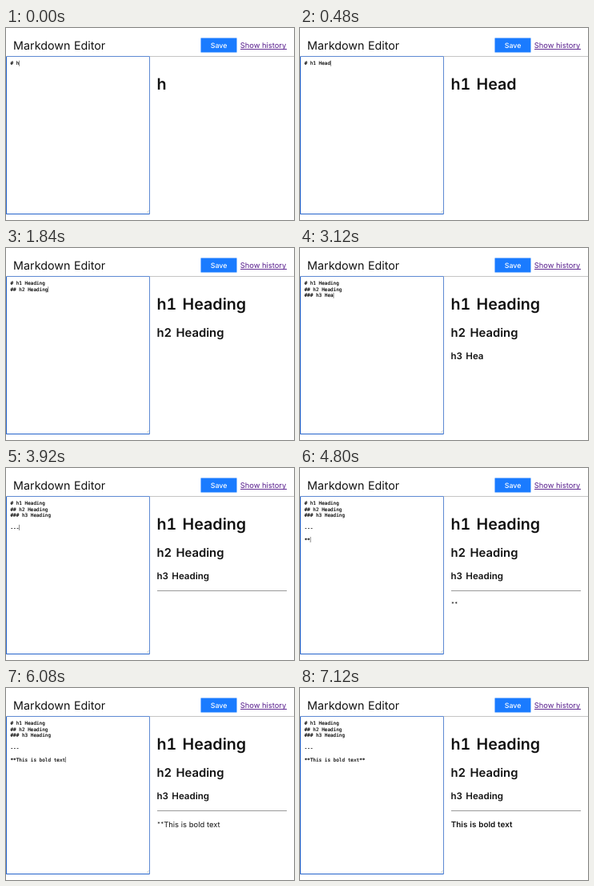
Write an HTML page that moves like this. It is 360 px wide and 240 px high and loops after 7200 ms.

```html
<!DOCTYPE html>
<html lang="en">
<head>
<meta charset="utf-8">
<title>Markdown Editor</title>
<style>
  html, body { margin: 0; width: 100%; height: 100%; overflow: hidden; background: #fff; }
  svg { display: block; width: 360px; height: 240px; }
  text {
    font-family: Inter, "Open Sans", sans-serif; font-variant-numeric: tabular-nums;
    fill: #111; white-space: pre; text-rendering: geometricPrecision;
  }
  .title { font-size: 14.3px; word-spacing: .05em; }
  .save { font-size: 8.8px; font-weight: 500; fill: #fff; text-anchor: middle; }
  .link { font-size: 9.4px; fill: #551a8b; }
  #source text { font: 6px "DejaVu Sans Mono", monospace; fill: #000; stroke: #000; stroke-width: .15px; }
  #h1, #h2, #h3 { font-weight: 600; word-spacing: .1em; }
  #h1 { font-size: 19.7px; }
  #h2 { font-size: 14.8px; }
  #h3 { font-size: 11.55px; }
  #para { font-size: 9.4px; word-spacing: .03em; }
  #para .stars { font-size: 6.8px; letter-spacing: -.03em; baseline-shift: 1.6px; }
  #para .bold { font-size: 9.9px; font-weight: 600; }
  #para .em { font-style: italic; }
</style>
</head>
<body>
<svg viewBox="0 0 360 240">
  <text class="title" x="9.1" y="26.5">Markdown Editor</text>
  <rect x="243.5" y="12.5" width="45" height="18" fill="#1a7bff"/>
  <text class="save" x="266.1" y="25">Save</text>
  <text class="link" x="292.8" y="25">Show history</text>
  <path d="M293 26.5H351" stroke="#551a8b" stroke-width=".9"/>
  <path d="M0 35.5H360" stroke="#c4c4c4"/>
  <rect x=".5" y="35.5" width="179" height="197" rx=".5" fill="#fff" stroke="#5f8ad2"/>
  <path d="M.5 36V232.5H179.5" fill="none" stroke="#2463cc"/>
  <path d="M175.8 231L178.8 228M177.6 231L178.8 229.8" stroke="#999" stroke-width=".5"/>
  <g id="source"></g>
  <rect id="caret" width=".7" height="7" fill="#555"/>
  <text id="h1" x="188.5" y="77.2"></text>
  <text id="h2" x="188.5" y="111.3"></text>
  <text id="h3" x="188.5" y="139.1"></text>
  <rect id="rule" x="189" y="153" width="162" height="1" fill="#999"/>
  <text id="para" x="188.8"></text>
</svg>
<script>
  const LOOP = 7200, STEP = 80;
  const LEFT = 5.5, TOP = 46.3, CELL = 3.612, LINE = 7.55;
  const SCRIPT = '# h1 Heading\n## h2 Heading\n### h3 Heading\n\n---\n\n**This is bold text**';

  // Typing rhythm: [time, characters typed]
  const RHYTHM = [
    [0, 3], [800, 13], [1200, 16], [1840, 26], [2400, 30], [3120, 37], [3600, 43],
    [3920, 46], [4320, 48], [4640, 50], [4800, 50], [6080, 67], [6400, 68], [6560, 69], [LOOP, 69]
  ];

  const $ = id => document.getElementById(id);
  const rows = SCRIPT.split('\n').map((_, i) => {
    const row = document.createElementNS('http://www.w3.org/2000/svg', 'text');
    row.setAttribute('x', LEFT);
    row.setAttribute('y', TOP + i * LINE);
    return $('source').appendChild(row);
  });

  function typedAt(t) {
    const i = RHYTHM.findIndex(([time]) => time > t);
    const [t0, n0] = RHYTHM[i - 1], [t1, n1] = RHYTHM[i];
    return Math.floor(n0 + (n1 - n0) * (t - t0) / (t1 - t0) + 1e-6);
  }

  const span = (name, text) => `<tspan class="${name}">${text}</tspan>`;

  function inline(text) {
    return text
      .replace(/^\*\*([^*]+)\*\*$/, (_, s) => span('bold', s))
      .replace(/^\*\*([^*]+)\*$/, (_, s) => span('stars', '*') + span('em', s))
      .replace(/^\*+/, s => span('stars', s));
  }

  function preview(lines) {
    for (let i = 0; i < 3; i++) {
      const heading = /^#+ (.+)$/.exec(lines[i] || '');
      $('h' + (i + 1)).textContent = heading ? heading[1] : '';
    }
    const ruled = lines[4] === '---';
    $('rule').style.display = ruled ? '' : 'none';
    $('para').setAttribute('y', ruled ? 173.8 : 163);
    $('para').innerHTML = inline((ruled ? lines[6] : lines[4]) || '');
  }

  let shown = -1;
  function draw(t) {
    const count = typedAt(t);
    $('caret').style.display = t < 7060 ? '' : 'none';
    if (count === shown) return;
    shown = count;
    const lines = SCRIPT.slice(0, count).split('\n');
    rows.forEach((row, i) => { row.textContent = lines[i] || ''; });
    const last = lines.length - 1;
    $('caret').setAttribute('x', LEFT + lines[last].length * CELL);
    $('caret').setAttribute('y', TOP + last * LINE - 5.6);
    preview(lines);
  }

  const start = performance.now();
  function tick() {
    const t = (performance.now() - start) % LOOP;
    draw(Math.floor(t / STEP) * STEP);
    requestAnimationFrame(tick);
  }
  tick();
</script>
</body>
</html>
```
